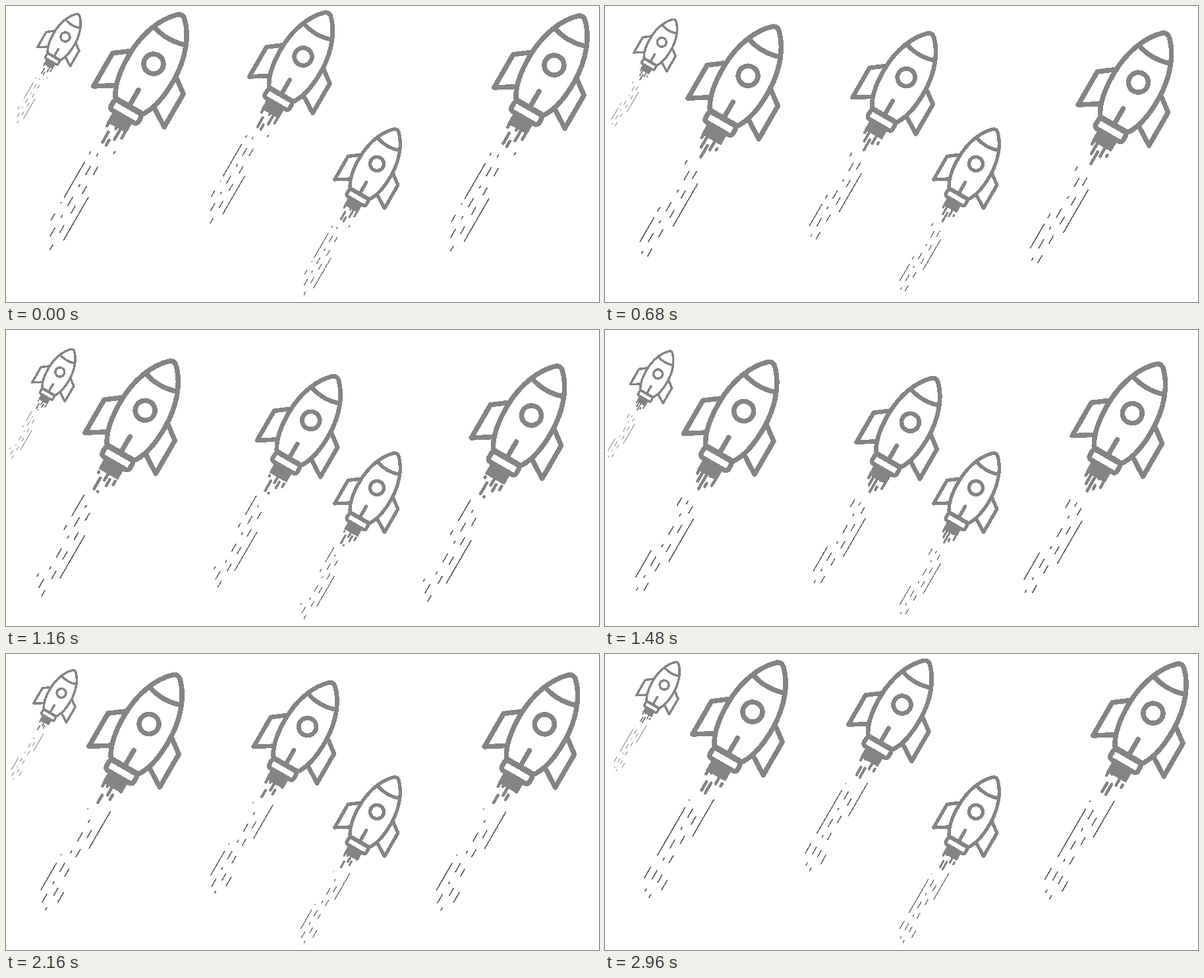
An HTML page that plays this animation: 900x450 px, repeating every 3 s.

```html
<!DOCTYPE html>
<html lang="en">
<head>
<meta charset="utf-8">
<title>Rockets</title>
<style>
  html, body { margin: 0; width: 100%; height: 100%; overflow: hidden; background: #fff; }
  svg { display: block; width: 900px; height: 450px; shape-rendering: crispEdges; }
</style>
</head>
<body>
<svg viewBox="0 0 900 450">
  <defs>
    <!-- Upright rocket; the origin is the centre of its window. -->
    <g id="rocket" fill="none" stroke="#848484" stroke-width="7.5" stroke-linejoin="round">
      <path d="M-6-83Q0-88 6-83C24-66 39-34 39 8C39 36 35 56 26 71Q25 74 21 74H-21Q-25 74-26 71C-35 56-39 36-39 8C-39-34-24-66-6-83Z"/>
      <path d="M-27-49Q0-40 27-49"/>
      <circle r="15"/>
      <path d="M0 46V73" stroke-linecap="round"/>
      <path d="M-38-1L-62 17V75L-32 56M38-1L62 17V75L32 56"/>
      <rect x="-24" y="75.5" width="48" height="17" rx="5"/>
      <path d="M-17 93H17V112H-17Z" fill="#848484" stroke="none"/>
      <path id="flames" stroke-width="4.6" stroke-linecap="round"/>
      <path id="streaks" stroke="#666" stroke-width="1.8"/>
    </g>
  </defs>
  <g id="fleet"></g>
</svg>
<script>
const LOOP = 3000, STEP = 40, SPEED = 0.38;

// Home position, size, drift to the turning point, and the time of the turn.
const rockets = [
  { x: 90, y: 47, size: 0.464, dx: -9.5, dy: 20, turn: 1550 },
  { x: 224, y: 88, size: 1, dx: -13.5, dy: 36, turn: 1350 },
  { x: 451, y: 77, size: 0.895, dx: 12.5, dy: 64, turn: 1370 },
  { x: 563, y: 240, size: 0.705, dx: 0, dy: 0, turn: 1500 },
  { x: 832, y: 90, size: 1, dx: -34.5, dy: 40, turn: 1135 }
];

// Lanes run from `top` to `end`; `dashes` alternates dash and gap lengths.
const flameLanes = [
  { x: -14, top: 109, end: 117, phase: 104, dashes: [18, 15] },
  { x: -7.5, top: 109, end: 142, phase: 124, dashes: [19, 15] },
  { x: -0.5, top: 109, end: 143, phase: 134, dashes: [34, 20] },
  { x: 6, top: 109, end: 129, phase: 112, dashes: [17, 12] },
  { x: 14.5, top: 109, end: 122, phase: 109, dashes: [18, 13] }
];
const streakLanes = [
  { x: -5, top: 160, end: 318, phase: 182, dashes: [16, 16, 5, 17] },
  { x: 5, top: 164, end: 324, phase: 314, dashes: [14, 20] },
  { x: 15.7, top: 144, end: 304, phase: 225, dashes: [76, 76] }
];

// The left lane is irregular: start and length of each dash.
const leftLane = { x: -16, top: 157, end: 301 };
const leftDashes = [
  [-962, 2], [-948, 85], [-844, 64], [-706, 44], [-583, 2], [-568, 48],
  [-492, 1], [-478, 60], [-402, 15], [-309, 63], [-230, 8], [-145, 51],
  [-19, 8], [-1, 63], [163, 5], [181, 63], [252, 2], [272, 12]
];

const byId = id => document.getElementById(id);
const fleet = byId("fleet"), flames = byId("flames"), streaks = byId("streaks");
for (const rocket of rockets) {
  rocket.node = document.createElementNS("http://www.w3.org/2000/svg", "use");
  rocket.node.setAttribute("href", "#rocket");
  fleet.append(rocket.node);
}

function dash({ x, top, end }, start, length) {
  const a = Math.max(top, start), b = Math.min(end, start + length);
  return b > a ? `M${x} ${a.toFixed(2)}V${b.toFixed(2)}` : "";
}

function lanePath(lane, offset) {
  const period = lane.dashes.reduce((sum, n) => sum + n, 0);
  const shift = (lane.phase + offset - lane.top + period) % period;
  let y = lane.top + shift - period, d = "";
  for (let i = 0; y < lane.end; i++) {
    const length = lane.dashes[i % lane.dashes.length];
    if (i % 2 === 0) d += dash(lane, y, length);
    y += length;
  }
  return d;
}

function drift(t, turn) {
  const part = t < turn ? t / turn : (LOOP - t) / (LOOP - turn);
  return (1 - Math.cos(Math.PI * part)) / 2;
}

function draw(t) {
  const offset = t * SPEED;
  const paths = lanes => lanes.map(lane => lanePath(lane, offset)).join("");
  flames.setAttribute("d", paths(flameLanes));
  streaks.setAttribute("d", paths(streakLanes) +
    leftDashes.map(([start, length]) => dash(leftLane, start + offset, length)).join(""));
  for (const { node, x, y, size, dx, dy, turn } of rockets) {
    const k = drift(t, turn);
    node.setAttribute("transform",
      `translate(${x + dx * k} ${y + dy * k}) rotate(30) scale(${size})`);
  }
}

const begin = performance.now();
function tick() {
  const elapsed = (performance.now() - begin) % LOOP;
  draw(Math.floor(elapsed / STEP) * STEP);
  requestAnimationFrame(tick);
}
tick();
</script>
</body>
</html>
```
